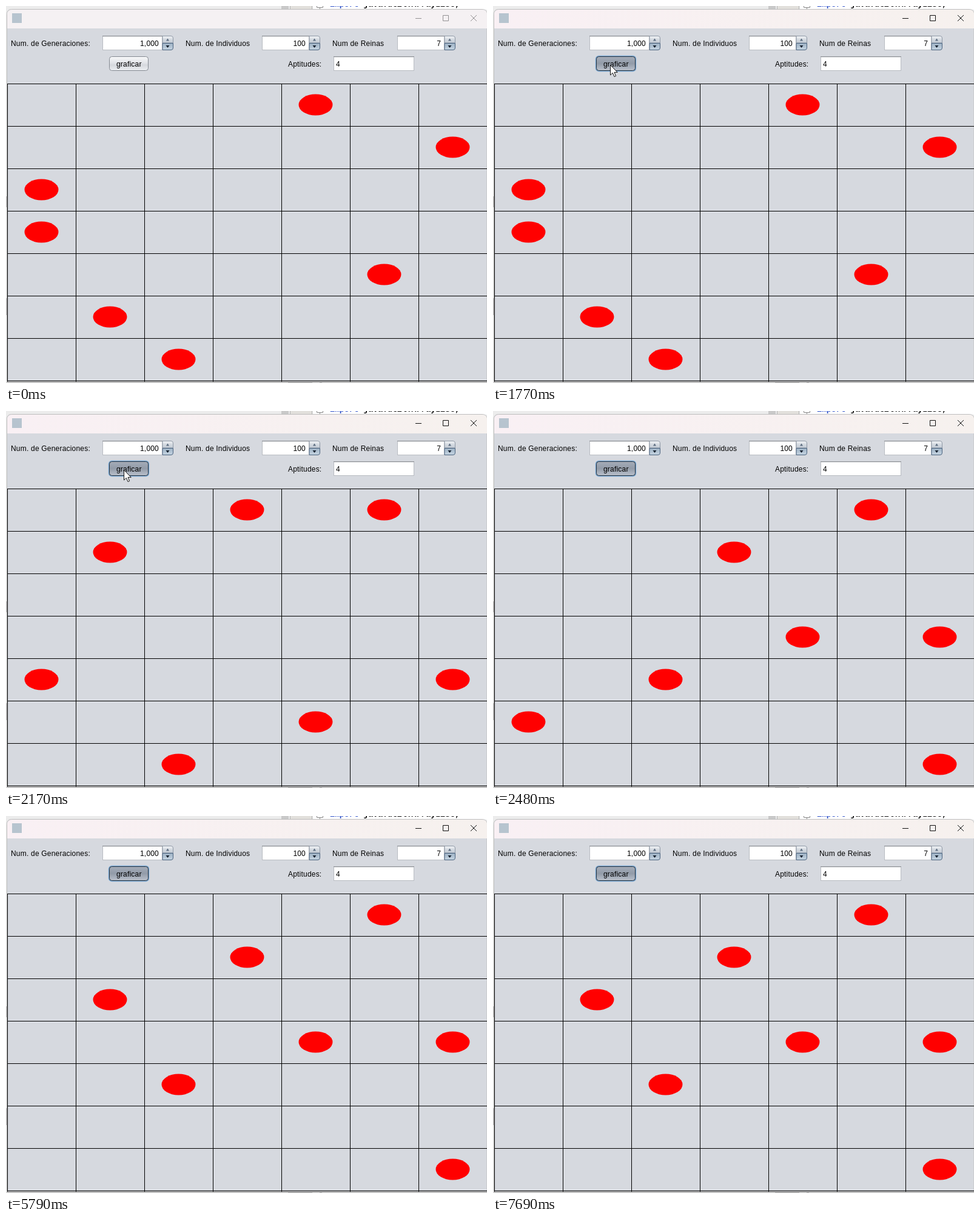
Animation, 793 px wide and 622 px high, one loop 8000 ms. Source, as an HTML page:

```html
<!DOCTYPE html>
<html lang="es">
<head>
<meta charset="utf-8">
<title>Reinas</title>
<style>
  html, body { margin: 0; width: 100%; height: 100%; overflow: hidden; background: #ececec; }
  svg { display: block; width: 793px; height: 622px; }
  text { font: 12px "Liberation Sans", Arial, sans-serif; letter-spacing: .2px; white-space: pre; }
  .code { font: bold 13.2px "Liberation Mono", monospace; letter-spacing: 0; }
  .end { text-anchor: end; }
</style>
</head>
<body>
<svg viewBox="0 0 793 622">
  <defs>
    <linearGradient id="up" x2="0" y2="1">
      <stop offset="0" stop-color="#f3f5f7"/><stop offset=".5" stop-color="#d3d9e0"/><stop offset="1" stop-color="#c3cbd5"/>
    </linearGradient>
    <linearGradient id="down" x2="0" y2="1">
      <stop offset="0" stop-color="#9db1c4"/><stop offset="1" stop-color="#c6d5e2"/>
    </linearGradient>
    <linearGradient id="idle" x2="0" y2="1">
      <stop offset="0" stop-color="#f8f9fa"/><stop offset=".45" stop-color="#e2e4e8"/>
      <stop offset=".6" stop-color="#d5d8dd"/><stop offset="1" stop-color="#edeff2"/>
    </linearGradient>
    <linearGradient id="hover" x2="0" y2="1">
      <stop offset="0" stop-color="#fdfdfe"/><stop offset=".45" stop-color="#eceef1"/>
      <stop offset=".6" stop-color="#e1e4e8"/><stop offset="1" stop-color="#f7f8fa"/>
    </linearGradient>
    <linearGradient id="pressed" x2="0" y2="1">
      <stop offset="0" stop-color="#a4acb8"/><stop offset=".5" stop-color="#929ba8"/><stop offset="1" stop-color="#bac1cc"/>
    </linearGradient>
    <linearGradient id="bar">
      <stop offset="0" stop-color="#f9f0f4"/><stop offset="1" stop-color="#f6f1ee"/>
    </linearGradient>
  </defs>

  <!-- Editor behind the window -->
  <rect width="793" height="622" fill="#ececec"/>
  <rect x="454" width="12" height="6" fill="#c9c9c9"/>
  <rect x="468" width="37" height="6" fill="#e2e0dc"/>
  <path d="M468.5 0V6M504.5 0V6" stroke="#b5b5b5"/>
  <rect x="506" width="287" height="6" fill="#fff"/>
  <path d="M512.5 0V2.5H522.5V0M517.5 2V6" fill="none" stroke="#888"/>
  <text class="code" x="534" y="1" fill="#2d50c8" font-style="italic">import <tspan fill="#111" font-style="normal">java.util.ArrayList;</tspan></text>
  <path d="M.5 314V332M.5 482V510" stroke="#aaa"/>

  <!-- Window -->
  <path d="M1.5 620V13.5Q1.5 5.5 9.5 5.5H785Q793 5.5 793 13.5V620Z" fill="#d6d9df" stroke="#bebebe"/>
  <path id="title" d="M2 37V14Q2 6 10 6H785Q793 6 793 14V37Z"/>
  <rect x="10" y="12" width="16" height="16" fill="#b7c4cf"/>
  <path id="caption" d="M675 20.5H685M720.5 15.5H729.5V24.5H720.5ZM766 15L776 25M776 15L766 25" fill="none"/>

  <g id="form"></g>
  <g id="button">
    <rect id="ring" x="168.8" y="81.8" width="67.4" height="26.4" rx="5.5" fill="#73a4d1"/>
    <rect id="face" x="170.5" y="83.5" width="64" height="23" rx="4"/>
    <text x="182" y="100">graficar</text>
  </g>

  <path id="grid" stroke="#000" fill="none" shape-rendering="crispEdges"/>
  <path d="M2 620.5H793" stroke="#a8a8a8"/>
  <path d="M0 621.5H793" stroke="#cfcfcf"/>
  <path d="M465 621.5H505M517 621.5H521" stroke="#a2a2a2"/>
  <g id="queens" fill="#f00"></g>
  <path id="cursor" d="M.5 .5V17L4.3 13.4L7 19.6L9.6 18.5L7 12.4H12.2Z" fill="#fff" stroke="#111"/>
</svg>
<script>
const LOOP = 8000;
const CLICK = 1770;
const $ = id => document.getElementById(id);

// Each queen is a column digit followed by a row digit.
const settled = "50 31 12 43 63 24 66";
const swapped = settled.replace("63", "36");
const raised = settled.replace("63", "62");
const boards = [
  [0, "40 61 02 03 54 15 26"],
  [2010, "10 51 32 63 04 44 26"],
  [2090, "30 11 62 23 04 45 66"],
  [2170, "30 50 11 04 64 45 26"],
  [2340, "50 31 02 43 64 15 26"],
  [2410, "50 31 13 63 24 05 46"],
  [2480, "50 31 43 63 24 05 66"],
  [4470, settled],
  [5220, swapped], [5320, settled],
  [5560, raised], [5790, settled],
  [6380, swapped], [6530, settled],
  [7620, raised], [7690, settled]
];

const label = (x, y, s, cls = "") => `<text class="${cls}" x="${x}" y="${y}">${s}</text>`;

const field = (x, y, w) =>
  `<rect x="${x + .5}" y="${y + .5}" width="${w - 1}" height="23" fill="#fff" stroke="#b9bcc2"/>
   <path d="M${x} ${y + .5}H${x + w}" stroke="#8c8f94"/>
   <path d="M${x + 1} ${y + 1.5}H${x + w - 1}" stroke="#dddfe2"/>`;

function spinner(x, w, value) {
  const b = x + w, mid = b + 8.5;
  return field(x, 49, w) + label(b - 6, 66, value, "end") +
    `<path d="M${b} 49.5H${b + 14}Q${b + 17.5} 49.5 ${b + 17.5} 53V61H${b}Z" fill="url(#up)" stroke="#8f99a6"/>
     <path d="M${b} 61.5H${b + 17.5}V69Q${b + 17.5} 72.5 ${b + 14} 72.5H${b}Z" fill="url(#down)" stroke="#4d6580"/>
     <path d="M${mid - 2.5} 57.5H${mid + 2.5}L${mid} 53.5Z" fill="#5d6d80"/>
     <path d="M${mid - 3} 65H${mid + 3}L${mid} 69Z" fill="#14202e"/>`;
}

$("form").innerHTML =
  label(8, 66, "Num. de Generaciones:") + spinner(159, 99, "1,000") +
  label(296, 66, "Num. de Individuos") + spinner(422, 78, "100") +
  label(538, 66, "Num de Reinas") + spinner(645, 78, "7") +
  label(465, 100, "Aptitudes:") + field(540, 83, 133) + label(544, 100, "4");

let lines = "";
for (let i = 0; i < 8; i++) {
  lines += `M${2.5 + 113 * i} 128V620M2 ${128.5 + 70 * i}H793`;
}
$("grid").setAttribute("d", lines);

const queen = ([c, r]) =>
  `<ellipse cx="${58.5 + 113 * c}" cy="${163 + 70 * r}" rx="28" ry="17.5"/>`;

// The pointer sweeps in along a curve, sampled in ten steps.
function pointer(t) {
  if (t < 430 || t >= 2410) return null;
  if (t >= 1860) return { x: 194, y: 97 };
  const u = Math.min(1, Math.floor((t - 430) / (680 / 9) + 1e-6) / 9);
  const e = 1 - (1 - u) ** 2;
  return { x: Math.round(618 - 425 * e), y: Math.round(57 + 286 * e - 246 * e * e) };
}

let shown;
function draw(t) {
  const active = t >= CLICK;
  const p = pointer(t);
  const over = p && p.x >= 170 && p.x < 235 && p.y >= 83 && p.y < 107;

  $("title").setAttribute("fill", active ? "url(#bar)" : "#f5f1f3");
  $("caption").setAttribute("stroke", active ? "#111" : "#939193");
  $("ring").setAttribute("visibility", active ? "visible" : "hidden");
  $("face").setAttribute("fill", `url(#${active ? "pressed" : over ? "hover" : "idle"})`);
  $("face").setAttribute("stroke", active ? "#2c3641" : "#858a92");

  $("cursor").setAttribute("visibility", p ? "visible" : "hidden");
  if (p) $("cursor").setAttribute("transform", `translate(${p.x} ${p.y})`);

  const board = boards.filter(([start]) => start <= t).pop()[1];
  if (board !== shown) {
    $("queens").innerHTML = board.split(" ").map(queen).join("");
    shown = board;
  }
}

const begin = performance.now();
function tick() {
  draw((performance.now() - begin) % LOOP);
  requestAnimationFrame(tick);
}
tick();
</script>
</body>
</html>
```
